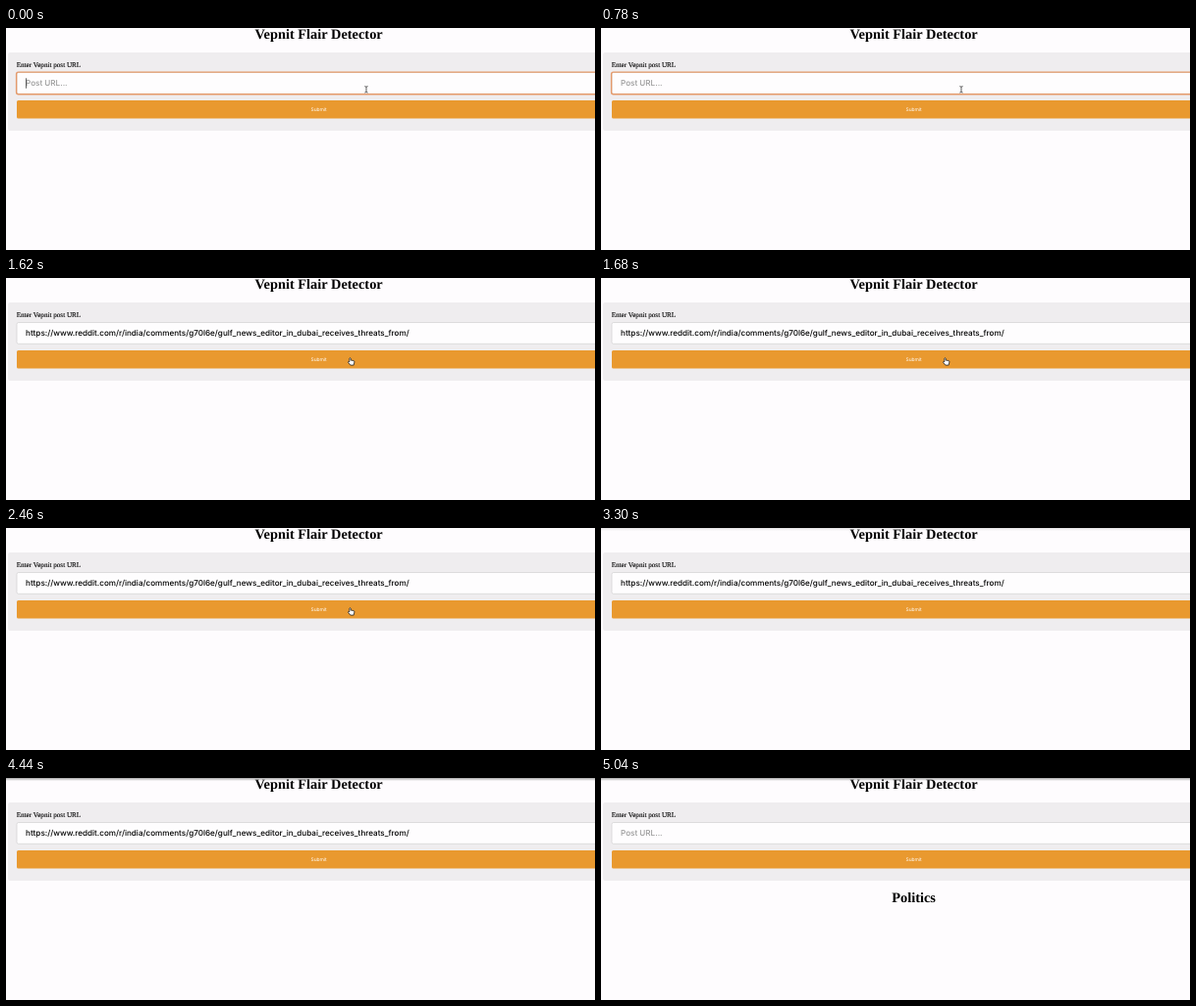
Write an HTML page that moves like this. It is 600 px wide and 227 px high and loops after 5460 ms.

```html
<!DOCTYPE html>
<html lang="en">
<head>
<meta charset="utf-8">
<title>Flair Detector</title>
<style>
  html, body { margin: 0; height: 100%; overflow: hidden; background: #fefcfe; }
  svg { display: block; width: 600px; height: 227px; text-rendering: geometricPrecision; }
  .heading { font: bold 14.4px "Liberation Serif", serif; text-anchor: middle; }
  .label { font: 7.15px "Liberation Serif", serif; stroke: #000; stroke-width: .12; }
  .field { font: 500 8.12px Inter, sans-serif; }
  .button { font: 4.95px Inter, sans-serif; text-anchor: middle; fill: #fff; }
</style>
</head>
<body>
<svg viewBox="0 0 600 227">
  <defs>
    <linearGradient id="fade" x2="0" y2="1">
      <stop stop-color="#aaa"/>
      <stop offset="1" stop-color="#aaa" stop-opacity="0"/>
    </linearGradient>
  </defs>
  <rect x="2" y="25" width="633" height="80" rx="2" fill="#efedef"/>
  <text class="heading" x="318.6" y="11.4">Vepnit Flair Detector</text>
  <text class="label" x="10.7" y="39.8">Enter Vepnit post URL</text>

  <rect x="11" y="45.5" width="615" height="21.8" rx="1.8" fill="#fefdfe" stroke="#ccc" stroke-width=".6"/>
  <rect id="focus" x="10.6" y="45.1" width="616" height="22.6" rx="2" fill="none" stroke="#e59a6a" stroke-width="1.4"/>
  <text id="value" class="field" x="20" y="59.4"></text>
  <rect id="caret" y="51.3" width=".7" height="10.4" fill="#222"/>

  <rect x="11" y="74" width="615" height="18.5" rx="1.5" fill="#e9992f"/>
  <text class="button" x="318.6" y="85.3">Submit</text>
  <text id="result" class="heading" x="318.6" y="127.3">Politics</text>
  <rect id="shadow" width="600" height="3" fill="url(#fade)"/>

  <path id="beam" fill="none" stroke="#333" stroke-width=".8"
    d="M-1.6-3.2Q0-3.2 0-2.2V2.2Q0 3.2-1.6 3.2M1.6-3.2Q0-3.2 0-2.2M0 2.2Q0 3.2 1.6 3.2"/>
  <path id="hand" fill="#fff" stroke="#222" stroke-width=".8" stroke-linejoin="round"
    d="M-1.8-3.2Q-1.1-4.2-.5-3.2V-1.2L2.4-.8Q3.3-.5 3.2.6L2.5 3.8H-.9L-3.2.9Q-3.2-.4-1.8.4Z"/>
  <path id="arrow" fill="#111" stroke="#fff" stroke-width=".5"
    d="M0 0V6L1.4 4.8 2.4 7 3.4 6.5 2.4 4.4H4.3Z"/>
</svg>
<script>
const LOOP = 5460, STEP = 60;
const PASTE = 840, SUBMIT = 1560, TOOLBAR = 3300, LOADED = 4500;
const URL_TEXT = "https://www.reddit.com/r/india/comments/g70l6e/gulf_news_editor_in_dubai_receives_threats_from/";

// Pointer path: time, x, y; it leaves through the top edge and returns
const path = [
  [0, 367, 62.8], [1320, 367, 62.8], [1560, 351.7, 85.3], [2880, 351.7, 85.3],
  [2940, 373, 51], [3000, 394, -15], [4140, 460, -12], [4200, 466, -1],
  [4320, 483, -1], [4380, 490, -12], [LOOP, 490, -12]
];

const el = id => document.getElementById(id);
const show = (id, on) => el(id).setAttribute("visibility", on ? "visible" : "hidden");

function pointerAt(t) {
  const next = path.findIndex(point => point[0] > t);
  const [t0, x0, y0] = path[next - 1], [t1, x1, y1] = path[next];
  const k = (t - t0) / (t1 - t0);
  return [x0 + (x1 - x0) * k, y0 + (y1 - y0) * k];
}

function draw() {
  const t = Math.floor(performance.now() % LOOP / STEP) * STEP;
  const filled = t >= PASTE && t < LOADED;
  const value = el("value");
  value.textContent = filled ? URL_TEXT : "Post URL...";
  value.setAttribute("fill", filled ? "#000" : "#999");

  show("focus", t < SUBMIT);
  show("caret", t < 420 || (t >= PASTE && t < 1260));
  el("caret").setAttribute("x", filled ? 20.3 + value.getComputedTextLength() : 20);
  show("result", t >= LOADED);
  show("shadow", t >= TOOLBAR);
  el("shadow").setAttribute("opacity", t < TOOLBAR + STEP ? .3 : 1);

  const [x, y] = pointerAt(t);
  const shape = y > 45 && y < 67 ? "beam" : y > 74 ? "hand" : "arrow";
  for (const id of ["beam", "hand", "arrow"]) {
    show(id, id === shape);
    el(id).setAttribute("transform", `translate(${x} ${y})`);
  }
  requestAnimationFrame(draw);
}
draw();
</script>
</body>
</html>
```
